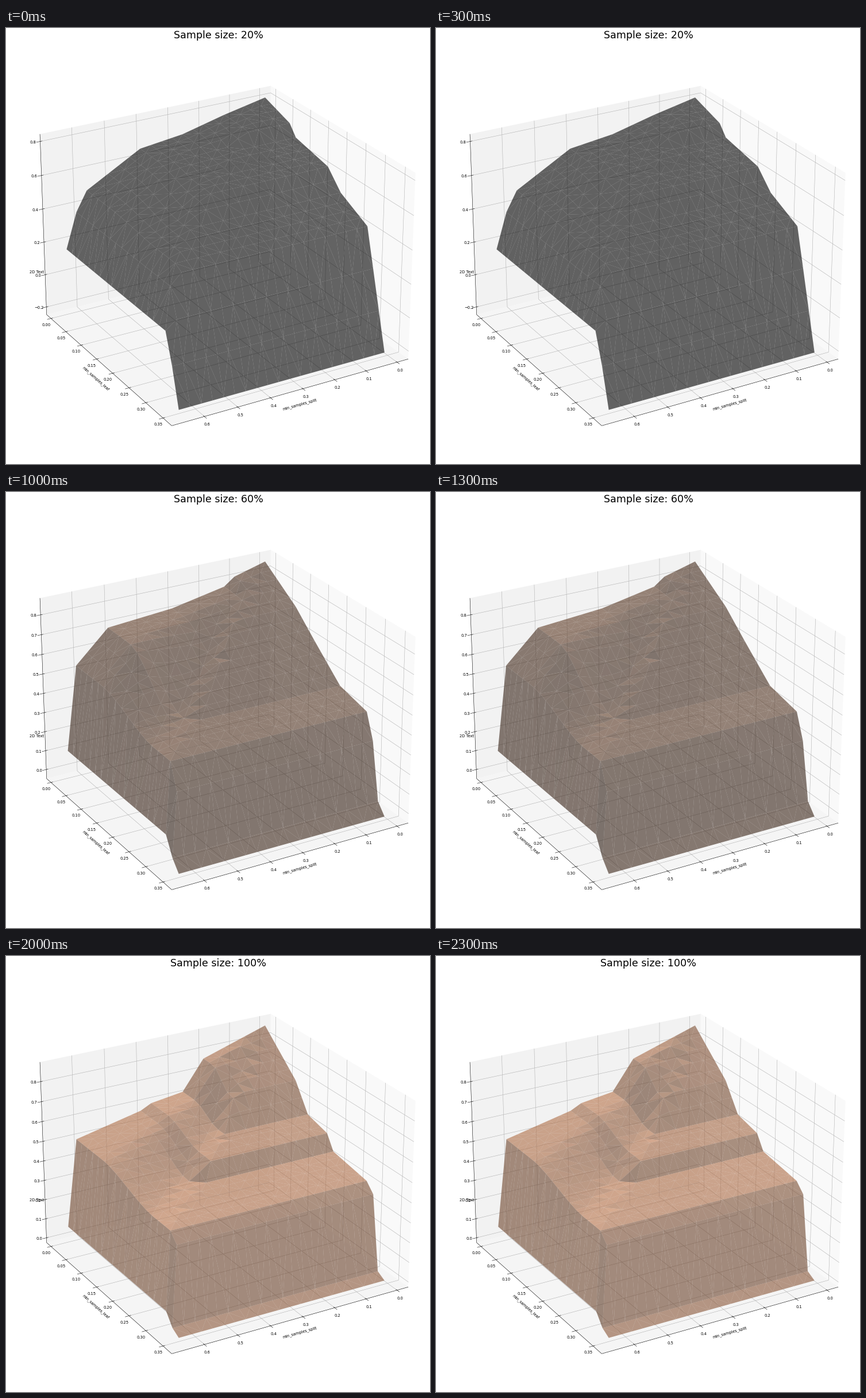
These frames come from a looping animation (738 px wide and 759 px high, 2.5 s). A matplotlib script:

```python
import numpy as np
import matplotlib.pyplot as plt
from matplotlib.animation import ArtistAnimation
from matplotlib.collections import LineCollection, PolyCollection
from matplotlib.tri import Triangulation

W, H, DPI = 738, 759, 64
PT = 72 / DPI  # points per pixel
N = 20
PAD = 0.02  # gap between axis limits and panes
MARGIN = PAD + (1 - 2 * PAD) / 22  # extra 5% margin on x and y
X_RANGE, Y_RANGE = (0.01, 0.65), (0.01, 0.35)
Z_RANGES = [(-0.226, 0.821), (-0.024, 0.866), (-0.030, 0.865),
            (-0.012, 0.878), (-0.007, 0.878)]

# Key points (grid index, percent of the z range) along each parameter.
# Every curve starts at (0, 100); the leaf curves end at (19, 0).
SPLIT_KEYS = [
    [(4, 95), (8, 89), (12, 86), (17, 69), (18, 58), (19, 38)],
    [(3, 97), (6, 90), (11, 82), (14, 80), (17, 74), (18, 65), (19, 23.5)],
    [(3, 95), (4, 90.5), (9, 84.5), (15, 81.5), (18, 64), (19, 16)],
    [(2, 95), (4, 80.5), (8, 74.5), (14, 72.5), (18, 56), (19, 15)],
    [(6, 88.5), (8, 72), (11, 69.5), (12, 66.5), (18, 58.5), (19, 9)],
]
LEAF_KEYS = [
    [(4, 94), (5, 88), (10, 83), (12, 73), (16, 64)],
    [(7, 86), (8, 83), (10, 66), (16, 57.5), (17, 44), (18, 10)],
    [(5, 85), (8, 72.5), (12, 56.5), (16, 52), (17, 38), (18, 6)],
    [(2, 85), (6, 74), (12, 51.5), (16, 49), (17, 39), (18, 5)],
    [(5, 79.5), (7, 64.5), (10, 61), (11, 53), (16, 49), (17, 44), (18, 2.5)],
]

BOX = 1.8294640721620434 * 25 / 24 * np.array([4, 4, 3]) / np.sqrt(41)
ELEV, AZIM, DIST = np.radians(25), np.radians(60), 10
SCALE, CX, CY = 3942, 379.3, 380.3
ALPHA = 0.6
LIGHT = np.array([-2, -2, 1]) / 3
GRID = "#b0b0b0"


def project(p):
    """Map pane fractions (0..1 per axis) to pixels and depth."""
    x, y, z = np.moveaxis((np.asarray(p, float) - 0.5) * BOX, -1, 0)
    side = y * np.cos(AZIM) - x * np.sin(AZIM)
    near = x * np.cos(AZIM) + y * np.sin(AZIM)
    up = z * np.cos(ELEV) - near * np.sin(ELEV)
    depth = DIST - near * np.cos(ELEV) - z * np.sin(ELEV)
    xy = np.stack([CX + SCALE * side / depth, CY - SCALE * up / depth], -1)
    return xy, depth


def to_pane(v, lim, margin):
    return margin + (v - lim[0]) / (lim[1] - lim[0]) * (1 - 2 * margin)


def lines(segments, color, zorder):
    return ax.add_collection(LineCollection(
        project(segments)[0], colors=color, linewidths=0.56 * PT, zorder=zorder))


def label(x, y, s, size=6.8, **kw):
    kw = {"ha": "center", "va": "center", **kw}
    return ax.text(x, y, s, fontsize=size * PT, family="DejaVu Sans", **kw)


def ticks(values, axis, place, edge, direction, offset, fmt):
    """Tick marks across an axis edge, with their labels."""
    direction = np.array(direction)
    marks, texts = [], []
    for v in values:
        p = np.array(edge, float)
        p[axis] = place(v)
        marks.append([p - 0.008 * direction, p + 0.016 * direction])
        x, y = project(p)[0]
        texts.append(label(x + offset[0], y + offset[1],
                           fmt.format(v).replace("-", "\u2212")))
    return [lines(marks, "black", 1.5), *texts]


def curve(keys):
    """Piecewise linear function through the key points."""
    at, value = np.transpose(keys)
    return lambda i: np.interp(i, at, value) / 100


def heights(k):
    """Surface on the (leaf, split) grid, 0..1 of the z range."""
    split = curve([(0, 100), *SPLIT_KEYS[k]])
    leaf = curve([(0, 100), *LEAF_KEYS[k], (19, 0)])
    j, i = np.mgrid[:N, :N]
    # Each split column sinks to the leaf curve before the leaf limit takes over.
    s = np.clip(2 * j / np.maximum(i, 1) - 0.5, 0, 1)
    s = s * s * (3 - 2 * s)
    sunk = split(i) + (leaf(0.88 * i) - split(i)) * s
    return np.minimum.reduce([split(i), leaf(j), sunk]).ravel()


def surface(k):
    lo, hi = Z_RANGES[k]
    t = heights(k)
    data = np.stack([gx, gy, lo + t * (hi - lo)], -1)[tri]
    n = np.cross(data[:, 1] - data[:, 0], data[:, 2] - data[:, 0])
    n /= np.linalg.norm(n, axis=1, keepdims=True)
    shade = 0.3 + 0.35 * (n @ LIGHT + 1)

    pane = np.stack([to_pane(gx, X_RANGE, MARGIN), to_pane(gy, Y_RANGE, MARGIN),
                     PAD + t * (1 - 2 * PAD)], -1)
    xy, depth = project(pane[tri])
    order = np.argsort(-depth.mean(axis=1))
    copper = k / 5 * np.array([1.25, 0.7812, 0.4975])
    rgba = np.column_stack([np.clip(shade[:, None] * copper, 0, 1),
                            np.full(len(tri), ALPHA)])
    return ax.add_collection(PolyCollection(
        xy[order], facecolors=rgba[order], edgecolors="none", linewidths=0, zorder=2))


def draw_frame(k):
    lim = Z_RANGES[k]
    step = 0.2 if k == 0 else 0.1
    values = np.arange(np.ceil(lim[0] / step), np.floor(lim[1] / step) + 1) * step + 0.0
    place = lambda v: to_pane(v, lim, PAD)
    grid = [[(1, 0, w), (0, 0, w), (0, 1, w)] for w in place(values)]
    return [
        lines(grid, GRID, 1),
        *ticks(values, 2, place, (1, 0, 0), (1, 0, 0), (-12.5, 1.5), "{:.1f}"),
        surface(k),
        label(369.5, 18.5, f"Sample size: {20 * (k + 1)}%", 17.5, va="baseline"),
    ]


fig = plt.figure(figsize=(W / DPI, H / DPI), dpi=DPI, facecolor="white")
ax = fig.add_axes([0, 0, 1, 1])
ax.set_xlim(0, W)
ax.set_ylim(H, 0)
ax.axis("off")

gx, gy = (g.ravel() for g in np.meshgrid(np.linspace(*X_RANGE, N),
                                         np.linspace(*Y_RANGE, N)))
tri = Triangulation(gx, gy).triangles
a, b, c = (np.stack([gx, gy], -1)[tri[:, m]] for m in range(3))
area = (b - a)[:, 0] * (c - a)[:, 1] - (b - a)[:, 1] * (c - a)[:, 0]
tri = tri[area > 1e-6]  # drop slivers on the border

# Panes: side wall, back wall, floor
for corners, grey in [([(0, 0, 0), (0, 1, 0), (0, 1, 1), (0, 0, 1)], 0.975),
                      ([(0, 0, 0), (1, 0, 0), (1, 0, 1), (0, 0, 1)], 0.95),
                      ([(0, 0, 0), (1, 0, 0), (1, 1, 0), (0, 1, 0)], 0.9625)]:
    ax.add_collection(PolyCollection([project(corners)[0]], facecolors=str(grey),
                                     edgecolors="none", zorder=0))

x_ticks, y_ticks = np.arange(7) / 10, np.arange(8) / 20
x_place = lambda v: to_pane(v, X_RANGE, MARGIN)
y_place = lambda v: to_pane(v, Y_RANGE, MARGIN)
lines([[(u, 1, 0), (u, 0, 0), (u, 0, 1)] for u in x_place(x_ticks)], GRID, 1)
lines([[(1, v, 0), (0, v, 0), (0, v, 1)] for v in y_place(y_ticks)], GRID, 1)
lines([[(0, 1, 0), (1, 1, 0)], [(1, 0, 0), (1, 1, 0)], [(1, 0, 0), (1, 0, 1)]],
      "black", 1.5)
ticks(x_ticks, 0, x_place, (0, 1, 0), (0, 1, 0), (5, 13.8), "{:.1f}")
ticks(y_ticks, 1, y_place, (1, 0, 0), (1, 0, 0), (-8.5, 11.2), "{:.2f}")

label(511, 655.5, "min_samples_split", rotation=15.7)
label(156.5, 610, "min_samples_leaf", rotation=-41.5)
label(41, 427, "2D Text", ha="left", va="baseline")

anim = ArtistAnimation(fig, [draw_frame(k) for k in range(5)],
                       interval=500, repeat=True, repeat_delay=0, blit=False)
plt.show()
```
